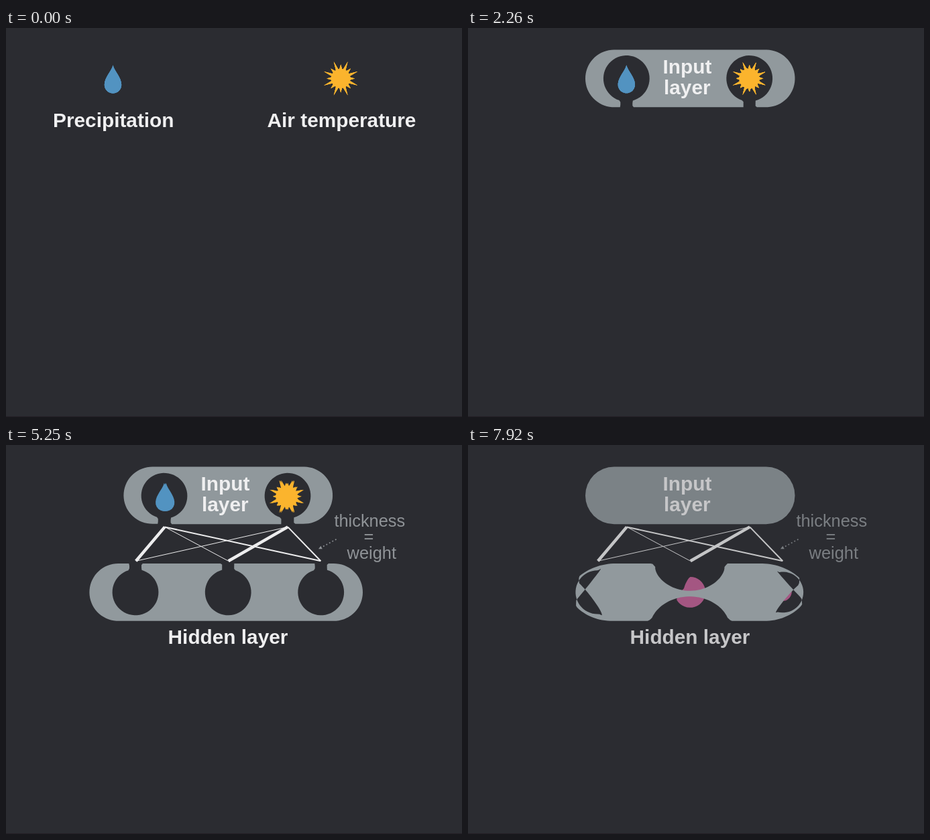
An HTML page for the animation above (7.99 s loop, 680 by 581 pixels).

```html
<!DOCTYPE html>
<html lang="en">
<head>
<meta charset="utf-8">
<title>Neural network layers</title>
<style>
  html, body { margin: 0; width: 100%; height: 100%; overflow: hidden; background: #2b2c31; }
  svg { display: block; width: 680px; height: 581px; }
  text { font: bold 29.8px "Liberation Sans", Arial, sans-serif; fill: #f0f0f1; text-anchor: middle; }
  .note text { font-size: 25.4px; font-weight: normal; fill: #909498; }
  .pill { fill: #91999d; }
  #lines { stroke: #eeeeef; fill: none; }
</style>
</head>
<body>
<svg viewBox="0 0 680 581">
  <rect y="580" width="680" height="1" fill="#241f25"/>
  <g id="icons"></g>
  <g id="input">
    <path id="inputPill" class="pill"/>
    <g id="inputText">
      <text x="327" y="68">Input</text>
      <text x="326.8" y="99">layer</text>
    </g>
  </g>
  <g id="titles">
    <text x="160.3" y="148">Precipitation</text>
    <text x="500.5" y="148">Air temperature</text>
  </g>
  <g id="links">
    <g id="lines"></g>
    <text x="331" y="297">Hidden layer</text>
    <g class="note">
      <text x="542.3" y="122">thickness</text>
      <text x="541" y="144.5">=</text>
      <text x="545.3" y="170">weight</text>
      <path d="M492.5 140.8 L471 152.6" stroke="#909498" stroke-width="1.7" stroke-dasharray="1.8 3.3"/>
      <path d="M466 155.3 L469.4 150.8 L471.8 155.2 Z" fill="#909498"/>
    </g>
  </g>
  <path id="hiddenPill" class="pill"/>
</svg>
<script>
const SVG = "http://www.w3.org/2000/svg";
const LOOP = 7990, DURATION = 1500, SEGMENT = 4;
const BLUE = [82, 147, 193], YELLOW = [251, 180, 45], VIOLET = [66, -18, 225];
const INPUT = { x: 331.25, y: 75.4, half: 156.25, nodes: [236.3, 419.7] };
const HIDDEN = { x: 328.2, y: 219.9, half: 203.8, nodes: [193, 331.2, 469.7] };
// Each transition becomes visible at "show" but its clock runs from "start".
const PHASES = [[800, 765], [3060, 2910], [5250, 5045], [7370, 7185]]
  .map(([show, start]) => ({ show, start }));

const $ = id => document.getElementById(id);
const lerp = (a, b, p) => a + (b - a) * p;
const make = (parent, tag, attrs) => {
  const el = parent.appendChild(document.createElementNS(SVG, tag));
  for (const key in attrs) el.setAttribute(key, attrs[key]);
  return el;
};
const polar = (r, deg) => {
  const a = deg * Math.PI / 180;
  return [r * Math.sin(a), -r * Math.cos(a)];
};
const toPath = points => "M" + points.map(q => q.join(" ")).join("L") + "Z";

// --- shapes, all clockwise around their own centre ---
function pill({ x, half, nodes }, side) {
  const h = 42.9, r = 34.4, w = 9, joint = Math.sqrt(r * r - w * w);
  const notch = (node, s) => {
    const c = node - x;
    return `L${c + s * w} ${s * h}V${s * joint}A${r} ${r} 0 1 0 ${c - s * w} ${s * joint}V${s * h}`;
  };
  const top = side === "top" ? nodes.map(n => notch(n, -1)).join("") : "";
  const bottom = side === "bottom" ? [...nodes].reverse().map(n => notch(n, 1)).join("") : "";
  const e = half - h;
  return `M${-e} ${-h}${top}L${e} ${-h}A${h} ${h} 0 0 1 ${e} ${h}${bottom}L${-e} ${h}A${h} ${h} 0 0 1 ${-e} ${-h}Z`;
}

function sector(from, to, r = 23) {
  const large = to - from > 180 ? 1 : 0;
  return `M0 0L${polar(r, from)}A${r} ${r} 0 ${large} 1 ${polar(r, to)}Z`;
}

const circle = r => `M0 ${-r}A${r} ${r} 0 0 1 0 ${r}A${r} ${r} 0 0 1 0 ${-r}Z`;

const drop = "M0 -20C2 -11 12.7 -2 12.7 9.3A12.7 12.7 0 0 1 -12.7 9.3C-12.7 -2 -2 -11 0 -20Z";

const sun = toPath(Array.from({ length: 16 }, (_, i) => {
  const angle = i * 22.5;
  return [polar(14.2, angle - 8), polar(i % 2 ? 27.2 : 21, angle), polar(14.2, angle + 8)];
}).flat());

// --- morphing: sample both outlines, equalise point counts, align, interpolate ---
const ruler = document.createElementNS(SVG, "path");
function sample(d) {
  ruler.setAttribute("d", d);
  const length = ruler.getTotalLength(), n = Math.ceil(length / SEGMENT);
  return Array.from({ length: n }, (_, i) => {
    const q = ruler.getPointAtLength(length * i / n);
    return [q.x, q.y];
  });
}

const distance = (a, b) => Math.hypot(a[0] - b[0], a[1] - b[1]);

function addPoints(ring, count) {
  if (count <= 0) return;
  const target = ring.length + count;
  const step = ring.reduce((sum, q, i) => sum + distance(q, ring[(i + 1) % ring.length]), 0) / count;
  let i = 0, cursor = 0, next = step / 2;
  while (ring.length < target) {
    const a = ring[i % ring.length], b = ring[(i + 1) % ring.length], d = distance(a, b);
    if (next <= cursor + d) {
      const k = d ? (next - cursor) / d : 0;
      ring.splice(i + 1, 0, [lerp(a[0], b[0], k), lerp(a[1], b[1], k)]);
      next += step;
    } else {
      cursor += d;
      i++;
    }
  }
}

function align(ring, other) {
  const n = ring.length;
  let best = Infinity, shift = 0;
  for (let s = 0; s < n; s++) {
    let sum = 0;
    for (let i = 0; i < n && sum < best; i++) sum += distance(ring[(s + i) % n], other[i]) ** 2;
    if (sum < best) { best = sum; shift = s; }
  }
  return [...ring.slice(shift), ...ring.slice(0, shift)];
}

function morph(from, to = from) {
  let a = sample(from);
  const b = sample(to), diff = b.length - a.length;
  addPoints(a, diff);
  addPoints(b, -diff);
  a = align(a, b);
  return p => p <= 0 ? from : p >= 1 ? to
    : toPath(a.map((q, i) => [lerp(q[0], b[i][0], p), lerp(q[1], b[i][1], p)]));
}

// --- scene ---
const inputOpen = pill(INPUT, "bottom"), hiddenOpen = pill(HIDDEN, "top");
const inputSelf = morph(inputOpen), inputClose = morph(inputOpen, pill(INPUT));
const hiddenSelf = morph(hiddenOpen), hiddenFlip = morph(hiddenOpen, pill(HIDDEN, "bottom"));
const dropSelf = morph(drop), sunSelf = morph(sun);

const splits = [120, 240, 180];
const icons = HIDDEN.nodes.flatMap((node, i) => {
  const dropPie = sector(splits[i], 360), sunPie = sector(0, splits[i]);
  return [
    { node, color: BLUE, home: 159.5, slot: INPUT.nodes[0], self: dropSelf,
      fill: morph(drop, dropPie), merge: () => dropPie, shrink: 2 },
    { node, color: YELLOW, home: 499.2, slot: INPUT.nodes[1], self: sunSelf,
      fill: morph(sun, sunPie), merge: morph(sunPie, circle(i === 1 ? 23 : 2)), shrink: 0 }
  ];
});
for (const icon of icons) icon.el = make($("icons"), "path", {});

const weights = [[4.5, 1, 2], [1, 4.5, 2]];
weights.forEach((row, i) => row.forEach((width, j) => make($("lines"), "path", {
  d: `M${[236.8, 420.2][i]} 122.4L${[193.8, 331.7, 469.3][j]} 173.3`, "stroke-width": width
})));

const ease = x => x < 0.5 ? 4 * x ** 3 : 1 - 4 * (1 - x) ** 3;
const progress = (t, { show, start }) => t < show ? 0 : ease(Math.min(1, (t - start) / DURATION));

function place(el, d, x, y, scale = 1) {
  el.setAttribute("d", d);
  el.setAttribute("transform", `translate(${x} ${y}) scale(${scale})`);
}

function draw() {
  const t = performance.now() % LOOP;
  const [enter, connect, feed, merge] = PHASES.map(phase => progress(t, phase));
  const dim = 1 - 0.21 * feed;

  $("titles").setAttribute("opacity", 1 - enter);
  $("input").setAttribute("opacity", dim);
  $("inputText").setAttribute("opacity", enter);
  $("links").setAttribute("opacity", connect * dim);

  place($("inputPill"), feed ? inputClose(feed) : inputSelf(connect || enter),
    lerp(328, INPUT.x, enter), INPUT.y, enter);
  place($("hiddenPill"), merge ? hiddenFlip(merge) : hiddenSelf(feed || connect),
    HIDDEN.x, HIDDEN.y, connect);

  for (const icon of icons) {
    const d = merge ? icon.merge(merge) : feed ? icon.fill(feed) : icon.self(connect || enter);
    const x = lerp(lerp(icon.home, icon.slot, enter), icon.node, feed);
    place(icon.el, d, x, lerp(75.4, HIDDEN.y, feed), Math.max(0, 1 - icon.shrink * merge));
    const rgb = icon.color.map((c, k) => icon.color === YELLOW ? lerp(c, VIOLET[k], merge) : c);
    icon.el.setAttribute("fill", `rgb(${rgb.map(Math.round)})`);
  }
  requestAnimationFrame(draw);
}
draw();
</script>
</body>
</html>
```
